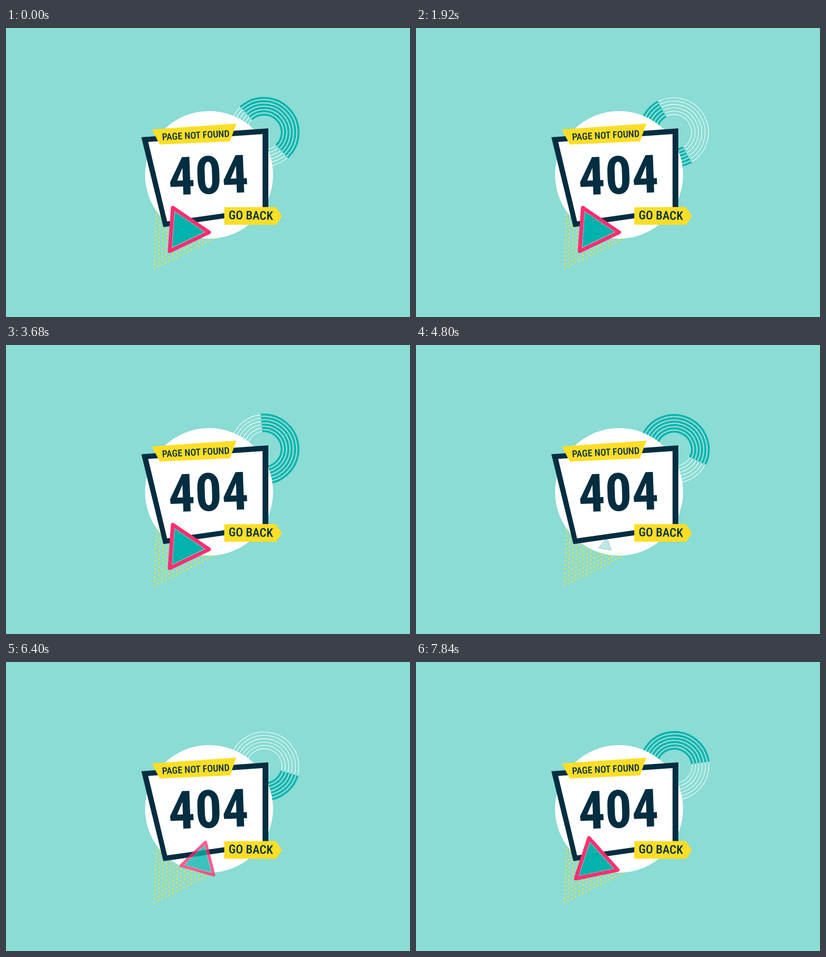
Animation, 770 px wide and 553 px high, one loop 8000 ms. Source, as an HTML page:

```html
<!DOCTYPE html>
<html lang="en">
<head>
<meta charset="utf-8">
<title>Page not found</title>
<style>
  html, body { margin: 0; width: 100%; height: 100%; overflow: hidden; background: #8adcd5; }
  svg { display: block; width: 770px; height: 553px; }
  text {
    font-family: "Roboto Condensed", Roboto, sans-serif;
    font-stretch: 75%;
    font-weight: 500;
    text-anchor: middle;
    fill: #032d40;
  }
  .yellow { fill: #ffde27; }
</style>
</head>
<body>
<svg viewBox="0 0 770 553">
  <g id="rings" fill="none"></g>
  <g id="dots" class="yellow"></g>
  <circle cx="387" cy="281" r="122" fill="#fff"/>

  <path d="M258 209 500 192V352L300 381Z" fill="#032d40"/>
  <path d="M271 218 489 203V344L307 370Z" fill="#fff"/>
  <text transform="translate(387 317) rotate(-2)" font-size="101" style="font-weight: 700">404</text>

  <path class="yellow" d="M278 194 439 183 427 217 293 223Z"/>
  <text transform="translate(362 211.5) rotate(-3)" font-size="18.1">PAGE NOT FOUND</text>

  <g id="triangle">
    <path id="outline" d="M318 344 387 391 312 427Z" fill="#cdeeea" stroke-width="7.4" stroke-linejoin="round"/>
    <path d="M318 344 387 391 312 427Z" fill="#02b2ac"
      transform="translate(339 387.3) scale(.825) translate(-339 -387.3)"/>
  </g>

  <path class="yellow" d="M416 343 514 342.5 526 360 515 376.5H416Z"/>
  <text transform="translate(466.5 366.5) rotate(1)" font-size="23">GO BACK</text>

  <path id="cursor" d="M0 0V11.5L2.5 9.2 4.5 13.6 6.4 12.7 4.6 8.5H7.8Z" fill="#000" stroke="#fff" stroke-width=".6"/>
</svg>
<script>
const LOOP = 8000, STEP = 160;
const RESTART = 4160, ENTRANCE = 4300;

const $ = id => document.getElementById(id);

function addShape(parent, name, attributes) {
  const shape = document.createElementNS(parent.namespaceURI, name);
  for (const key in attributes) shape.setAttribute(key, attributes[key]);
  parent.append(shape);
}

// Two half circles per ring: thin white and thick teal
function buildRings() {
  const radii = Array.from({ length: 6 }, (_, i) => 34 + 6.4 * i);
  for (const r of radii)
    addShape($('rings'), 'path', { d: `M${-r} 1A${r} ${r} 0 0 1 ${r} 1`, stroke: '#fff', 'stroke-width': 1.1 });
  for (const r of radii)
    addShape($('rings'), 'path', { d: `M${r} -1A${r} ${r} 0 0 1 ${-r} -1`, stroke: '#02b2ac', 'stroke-width': 3.6 });
}

function buildDots() {
  const size = 17;
  for (let i = 0; i <= size; i++)
    for (let j = 0; i + j <= size; j++)
      addShape($('dots'), 'circle', { cx: 283 + 7 * i + 0.31 * j, cy: 460 - 3.56 * i - 7.85 * j, r: 1.6 });
}

// Linear interpolation over [time, ...values] keys, extended beyond both ends
function track(keys, t) {
  let i = 1;
  while (i < keys.length - 1 && t > keys[i][0]) i++;
  const [a, b] = [keys[i - 1], keys[i]];
  const k = (t - a[0]) / (b[0] - a[0]);
  return a.slice(1).map((value, n) => value + (b[n + 1] - value) * k);
}

const firstSpin = [[0, -133], [960, -25], [1920, 61], [3680, 265]];
const secondSpin = [[4800, 206], [6400, 377], [7840, 532]];
const cursorPath = [[640, 598, 110], [800, 520, 82], [960, 467, 57], [1120, 455, 30], [1280, 450, 4]];

function draw(t) {
  const [angle] = track(t < RESTART ? firstSpin : secondSpin, t);
  $('rings').setAttribute('transform', `translate(492.3 199) rotate(${angle})`);

  const remaining = t < RESTART ? 0 : 1 - Math.min(1, (t - RESTART + 22) / ENTRANCE);
  const progress = 1 - remaining ** 2;
  $('triangle').setAttribute('transform',
    `translate(357 386) rotate(${720 * (1 - progress)}) scale(${progress}) translate(-357 -386)`);
  $('triangle').setAttribute('opacity', progress);
  $('outline').setAttribute('stroke', progress < 0.4 ? '#006e66' : '#fb2f6f');

  const [x, y] = track(cursorPath, t);
  $('cursor').setAttribute('transform', `translate(${x} ${y})`);
  $('cursor').setAttribute('visibility', t >= 640 && t <= 1280 ? 'visible' : 'hidden');
}

function tick() {
  draw(Math.floor(performance.now() % LOOP / STEP) * STEP);
  requestAnimationFrame(tick);
}

buildRings();
buildDots();
tick();
</script>
</body>
</html>
```
